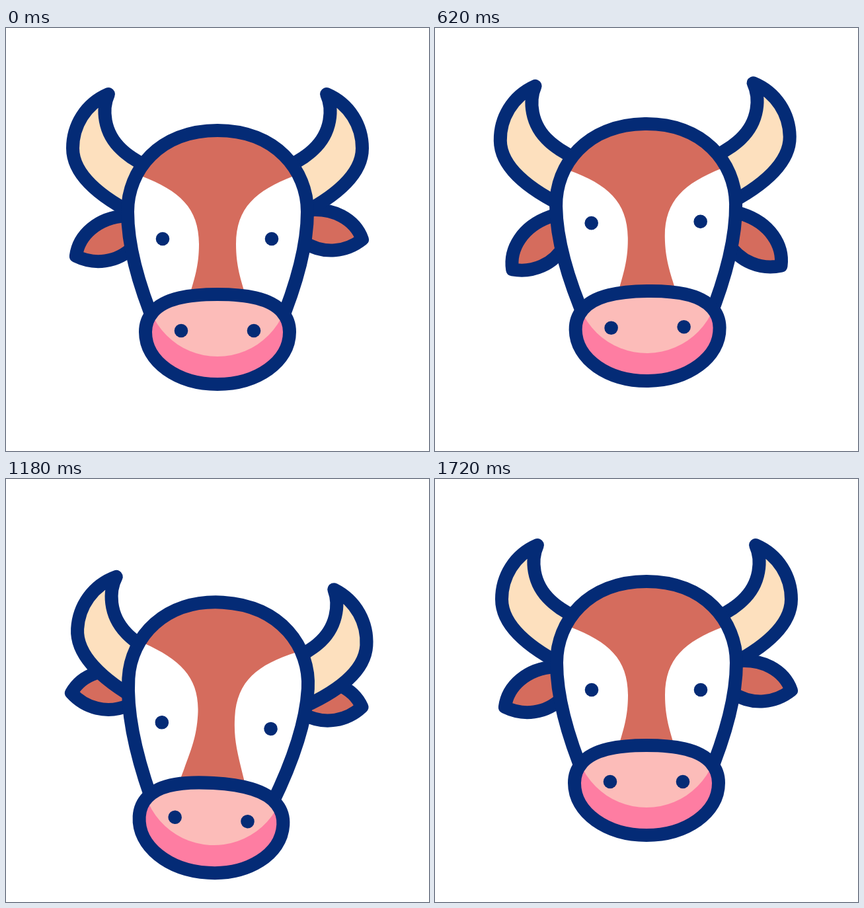
Recreate the animation shown at these times as an HTML page with a canvas. Size 640 by 640 pixels, loop 2400 ms.

```html
<!DOCTYPE html>
<html lang="en">
<head>
<meta charset="utf-8">
<title>Nodding cow</title>
<style>
  html, body { margin: 0; width: 100%; height: 100%; overflow: hidden; background: #fff; }
  canvas { display: block; width: 640px; height: 640px; }
</style>
</head>
<body>
<canvas id="stage"></canvas>
<script>
const LOOP = 2400, STEP = 20, MID = 320, RAD = Math.PI / 180;
const NAVY = '#042b76', BROWN = '#d56c5d', CREAM = '#fde0be',
      LIGHT = '#fcbcb9', PINK = '#fe7da2', WHITE = '#fff';

const canvas = document.getElementById('stage');
const ctx = canvas.getContext('2d');
const dpr = window.devicePixelRatio || 1;
canvas.width = canvas.height = 640 * dpr;

// Shapes of the left half; the right half is mirrored.
const HORN = new Path2D('M235 224 L190 196 C183 191 179 188 175 184 C147 158 145 122 155 100 C120 115 101 148 101 182 C101 220 140 256 205 287 Z');
const EAR = new Path2D('M215 287 L184 287 C140 287 110 312 104 343 C130 358 165 358 192 334 L215 325 Z');
const HEAD = new Path2D('M320 155 C232 155 184 215 184 278 C184 335 205 400 228 455 L412 455 C435 400 456 335 456 278 C456 215 408 155 320 155 Z');
const PATCH = new Path2D('M150 205 L205 224 C262 246 292 272 292 327 C292 360 285 380 276 410 L262 455 L150 455 Z');
const MUZZLE = new Path2D('M320 403 C280 403 240 408 222 430 C214 439 211 448 211 460 C211 505 260 539 320 539 C380 539 429 505 429 460 C429 448 426 439 418 430 C400 408 360 403 320 403 Z');

// Pose keys: tilt and ear droop in degrees, the rest are vertical shifts.
const TIMES = [0, 385, 420, 540, 620, 800, 860, 1020, 1230, 1380, 1620, 1720];
const KEYS = {
  tilt:   [0, 5.3, 5.2, 2.1, -0.8, -4.9, -3.9, 0, 3.7, 2.1, 0.15, 0],
  horns:  [0, 66, 64, 22, -14.5, -70, -63, 0.5, 63, 46, 4, 0],
  head:   [0, 44, 41, 14, -10, -37, -31, 5, 34, 22, 2, 0],
  eyes:   [0, 62, 57.5, 10, -25, -65, -55.5, 13, 58, 40, 3, 0],
  muzzle: [0, 65.5, 61, 4, -5, -66, -62, -11, 65, 51, 6, 0],
  earL:   [-3, 25, 23, 6, -5, -26, -23, 0, 16, 5, -2.5, -3],
  earR:   [-11, 24, 23, 6, -5, -26, -23, 0, 14, 2, -9, -11],
  droopL: [3.7, -12, -11, 6, 19, 32, 32, 0, -16, -11, 3, 3.7],
  droopR: [-8.6, -12, -11, 6, 19, 32, 32, 0, -18, -16, -10, -8.6]
};

// Smooth curve through the keys that never overshoots them.
function makeTrack(vals) {
  const slope = i => (vals[i + 1] - vals[i]) / (TIMES[i + 1] - TIMES[i]);
  const tangent = vals.map((v, i) => {
    if (i === 0 || i === vals.length - 1) return 0;
    const a = slope(i - 1), b = slope(i);
    return a * b > 0 ? 2 * a * b / (a + b) : 0;
  });
  return t => {
    const last = vals.length - 1;
    if (t >= TIMES[last]) return vals[last];
    let i = 0;
    while (t >= TIMES[i + 1]) i++;
    const d = TIMES[i + 1] - TIMES[i], u = (t - TIMES[i]) / d, w = 1 - u;
    return vals[i] * (1 + 2 * u) * w * w + vals[i + 1] * u * u * (3 - 2 * u)
         + d * u * w * (tangent[i] * w - tangent[i + 1] * u);
  };
}

const tracks = {};
for (const name in KEYS) tracks[name] = makeTrack(KEYS[name]);

function part(tilt, dy, draw) {
  ctx.save();
  ctx.translate(MID - 0.4 * Math.abs(tilt), MID + dy);
  ctx.rotate(tilt * RAD);
  ctx.translate(-MID, -MID);
  draw();
  ctx.restore();
}

function mirror() {
  ctx.translate(2 * MID, 0);
  ctx.scale(-1, 1);
}

function outlined(path, color) {
  ctx.fillStyle = color;
  ctx.fill(path);
  ctx.stroke(path);
}

function dot(x, y, r, color) {
  ctx.fillStyle = color;
  ctx.beginPath();
  ctx.arc(x, y, r, 0, 2 * Math.PI);
  ctx.fill();
}

function drawEar(droop) {
  ctx.translate(184, 317);
  ctx.rotate(-droop * RAD);
  ctx.translate(-184, -317);
  outlined(EAR, BROWN);
}

function drawHead() {
  ctx.fillStyle = BROWN;
  ctx.fill(HEAD);
  ctx.save();
  ctx.clip(HEAD);
  ctx.fillStyle = WHITE;
  ctx.fill(PATCH);
  mirror();
  ctx.fill(PATCH);
  ctx.restore();
  ctx.stroke(HEAD);
}

function drawMuzzle() {
  ctx.fillStyle = PINK;
  ctx.fill(MUZZLE);
  ctx.save();
  ctx.clip(MUZZLE);
  dot(MID, 388, 109, LIGHT);
  ctx.restore();
  ctx.stroke(MUZZLE);
  dot(265, 458, 10.3, NAVY);
  dot(375, 458, 10.3, NAVY);
}

function render(t) {
  const p = {};
  for (const name in tracks) p[name] = tracks[name](t);

  ctx.setTransform(dpr, 0, 0, dpr, 0, 0);
  ctx.fillStyle = WHITE;
  ctx.fillRect(0, 0, 640, 640);
  ctx.strokeStyle = NAVY;
  ctx.lineWidth = 20;
  ctx.lineJoin = ctx.lineCap = 'round';

  part(p.tilt, p.earL, () => drawEar(p.droopL));
  part(p.tilt, p.earR, () => { mirror(); drawEar(p.droopR); });
  part(p.tilt, p.horns, () => {
    outlined(HORN, CREAM);
    mirror();
    outlined(HORN, CREAM);
  });
  part(p.tilt, p.head, drawHead);
  part(p.tilt, p.eyes, () => {
    dot(237, 319, 10.3, NAVY);
    dot(402, 319, 10.3, NAVY);
  });
  part(p.tilt, p.muzzle, drawMuzzle);
}

const start = performance.now();
function tick() {
  const t = (performance.now() - start) % LOOP;
  render(Math.floor(t / STEP) * STEP);
  requestAnimationFrame(tick);
}
tick();
</script>
</body>
</html>
```
